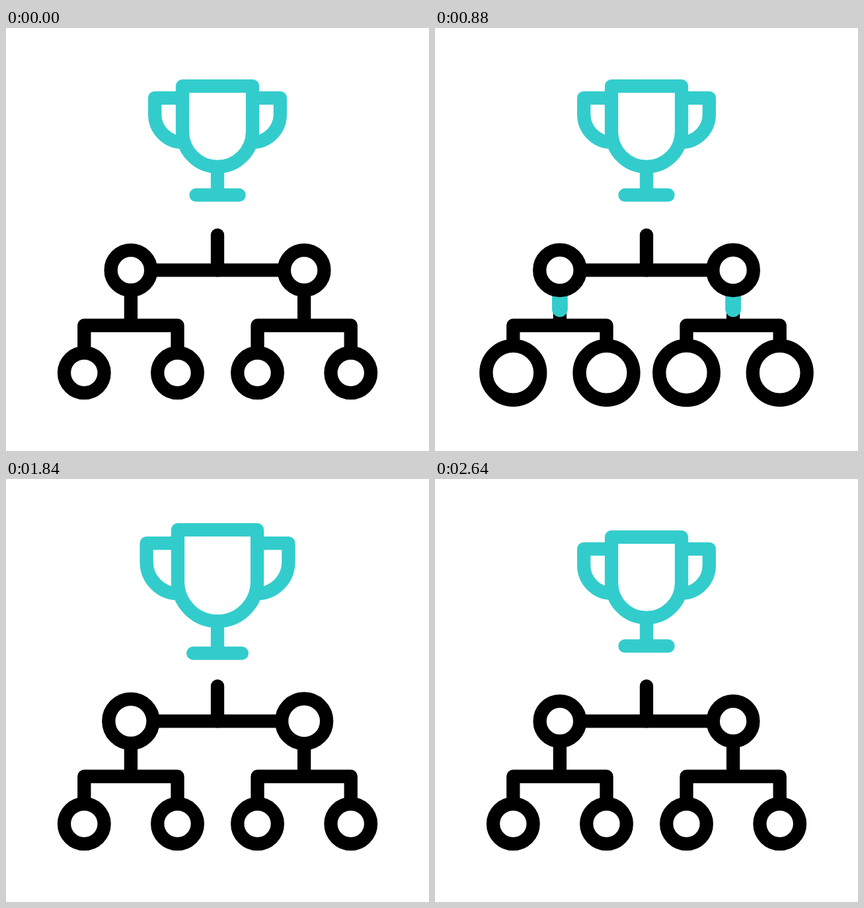
These frames come from a looping animation (640 px wide and 640 px high, 3000 ms). An HTML page with a canvas:

```html
<!DOCTYPE html>
<html>
<head>
<meta charset="utf-8">
<style>
  html, body { margin: 0; width: 100%; height: 100%; overflow: hidden; background: #fff; }
  canvas { display: block; }
</style>
</head>
<body>
<canvas id="stage" width="640" height="640"></canvas>
<script>
const ctx = document.getElementById('stage').getContext('2d');
const LOOP = 3000, STEP = 40;
const BLACK = '#000', TEAL = '#33cccc', WHITE = '#fff';
const LINE = 20.3, PULSE_LINE = 23.3;
const CX = 320, CUP_Y = 170.3;
const MID_Y = 366.4, BRANCH_Y = 450, LEAF_Y = 521.8;
const RADIUS = 30.3, EDGE = 40.5;

// x position and growth of each ring
const mids = [[188.9, 9], [451.1, 10.1]];
const leaves = [[118.3, 11.2], [259.5, 11.2], [380.5, 11.5], [521.7, 11.2]];

function ease(t, start, end) {
  const u = Math.min(1, Math.max(0, (t - start) / (end - start)));
  return u * u * (3 - 2 * u);
}

function swell(t, start, full, release, end) {
  return ease(t, start, full) - ease(t, release, end);
}

function trace(points) {
  ctx.beginPath();
  points.forEach(([x, y]) => ctx.lineTo(x, y));
}

function line(...points) {
  trace(points);
  ctx.stroke();
}

function pulse(points, head, tail) {
  if (head <= tail) return;
  let length = 0;
  for (let i = 1; i < points.length; i++) {
    length += Math.hypot(points[i][0] - points[i - 1][0], points[i][1] - points[i - 1][1]);
  }
  ctx.setLineDash([(head - tail) * length, 9999]);
  ctx.lineDashOffset = -tail * length;
  trace(points);
  ctx.stroke();
  ctx.setLineDash([]);
}

function ring(x, y, radius) {
  ctx.beginPath();
  ctx.arc(x, y, radius, 0, Math.PI * 2);
  ctx.fill();
  ctx.stroke();
}

function drawTree() {
  ctx.strokeStyle = BLACK;
  ctx.lineWidth = LINE;
  ctx.lineCap = 'butt';
  line([mids[0][0] + EDGE - 4, MID_Y], [mids[1][0] - EDGE + 4, MID_Y]);
  mids.forEach(([x], i) => {
    const left = leaves[2 * i][0], right = leaves[2 * i + 1][0], y = LEAF_Y - EDGE + 4;
    line([x, MID_Y + EDGE - 4], [x, BRANCH_Y]);
    line([left, y], [left, BRANCH_Y], [right, BRANCH_Y], [right, y]);
  });
  ctx.lineCap = 'round';
  line([CX, 313.5], [CX, MID_Y]);
}

function drawPulses(t) {
  ctx.strokeStyle = TEAL;
  ctx.lineWidth = PULSE_LINE;
  const lowHead = ease(t, 66, 858), lowTail = ease(t, 266, 1058);
  leaves.forEach(([x], i) => {
    const parent = mids[i >> 1][0];
    pulse([[x, LEAF_Y - EDGE], [x, BRANCH_Y], [parent, BRANCH_Y], [parent, MID_Y + EDGE]], lowHead, lowTail);
  });
  const highHead = ease(t, 880, 1584), highTail = ease(t, 979, 1683);
  mids.forEach(([x]) => {
    const start = x + Math.sign(CX - x) * RADIUS;
    pulse([[start, MID_Y], [CX, MID_Y], [CX, 314]], highHead, highTail);
  });
}

function drawRings(t) {
  ctx.strokeStyle = BLACK;
  ctx.fillStyle = WHITE;
  ctx.lineWidth = LINE;
  const low = swell(t, 40, 684, 790, 1460);
  const high = swell(t, 800, 1440, 1480, 2090);
  leaves.forEach(([x, grow]) => ring(x, LEAF_Y, RADIUS + grow * low));
  mids.forEach(([x, grow]) => ring(x, MID_Y, RADIUS + grow * high));
}

function drawCup(t) {
  const scale = 1 + 0.133 * swell(t, 1270, 1790, 1960, 2535);
  ctx.strokeStyle = TEAL;
  ctx.lineWidth = LINE;
  ctx.lineCap = 'round';

  // The outline scales while its stroke keeps its width
  ctx.save();
  ctx.translate(CX, CUP_Y);
  ctx.scale(scale, scale);
  ctx.beginPath();
  ctx.moveTo(-53, -82.4);
  ctx.lineTo(53, -82.4);
  ctx.lineTo(53, -13.4);
  ctx.arc(0, -13.4, 53, 0, Math.PI);
  ctx.closePath();
  ctx.moveTo(0, 39.6);
  ctx.lineTo(0, 82.4);
  ctx.moveTo(-32.5, 82.4);
  ctx.lineTo(32.5, 82.4);
  for (const side of [-1, 1]) {
    ctx.moveTo(side * 53, -64.5);
    ctx.lineTo(side * 94.8, -64.5);
    ctx.lineTo(side * 94.8, -39.5);
    ctx.arc(side * 52.6, -39.5, 42.2, side < 0 ? Math.PI : 0, Math.PI / 2, side < 0);
  }
  ctx.restore();
  ctx.stroke();
}

function render(now) {
  const t = Math.floor((now % LOOP) / STEP) * STEP;
  ctx.fillStyle = WHITE;
  ctx.fillRect(0, 0, 640, 640);
  drawTree();
  drawPulses(t);
  drawRings(t);
  drawCup(t);
}

ctx.lineJoin = 'round';
let origin = null;
function tick(now) {
  if (origin === null) origin = now;
  render(now - origin);
  requestAnimationFrame(tick);
}
render(0);
requestAnimationFrame(tick);
</script>
</body>
</html>
```
